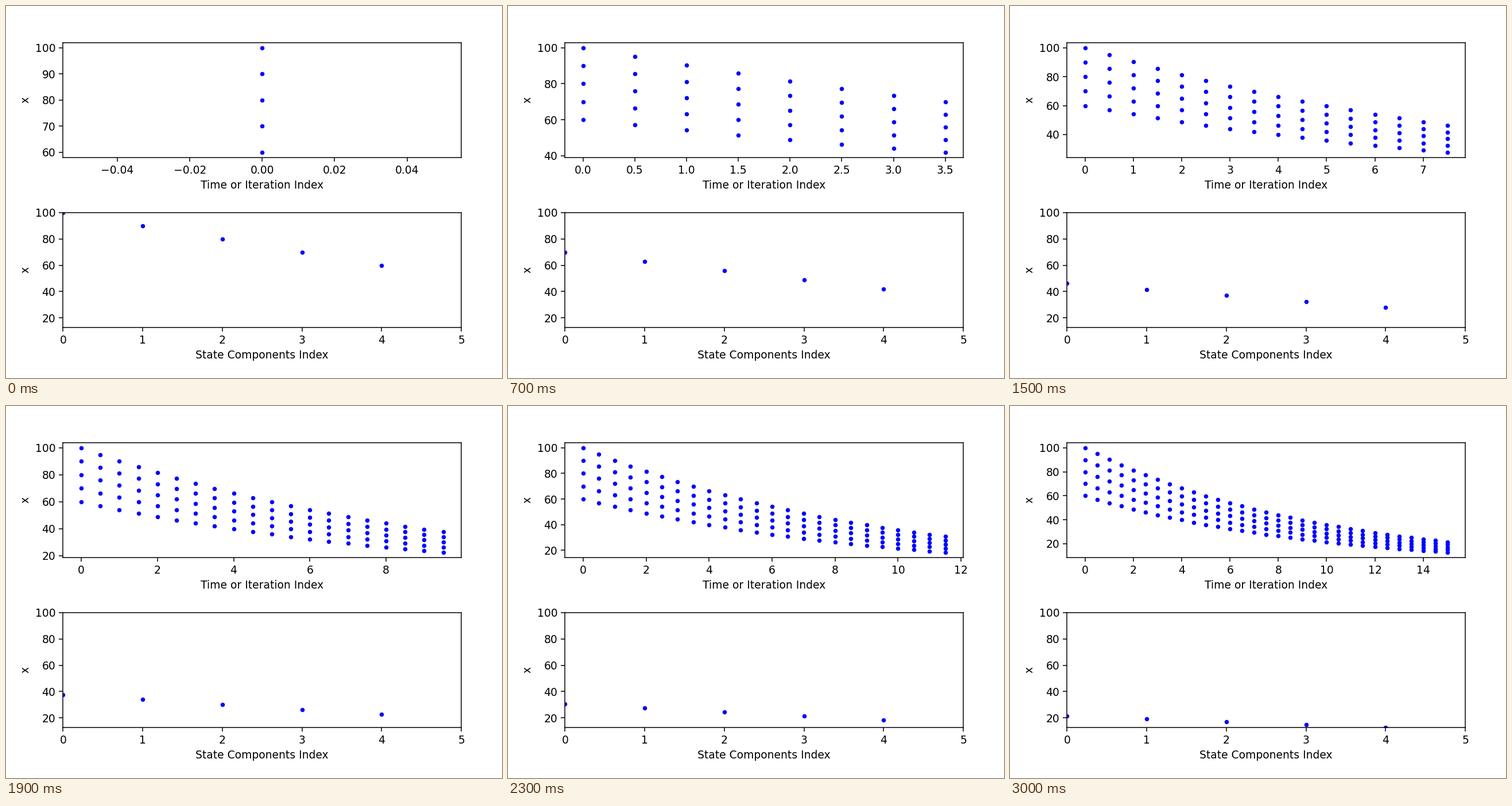
A matplotlib script for the animation above (3100 ms loop, 864 px wide and 648 px high).

```python
import numpy as np
import matplotlib.pyplot as plt
from matplotlib.animation import FuncAnimation

W, H, DPI = 864, 648, 135
STEPS, DT, DECAY = 31, 0.5, 0.95

plt.rcParams.update({"font.family": "DejaVu Sans", "font.size": 10})

start = np.arange(100, 59, -10)
times = np.arange(STEPS) * DT
states = start * DECAY ** np.arange(STEPS)[:, None]

fig = plt.figure(figsize=(W / DPI, H / DPI), dpi=DPI)


def panel(top, bottom, xlabel):
    """Add axes between two pixel rows measured from the top of the stage."""
    left, right = 99.4, 793.2
    ax = fig.add_axes([left / W, 1 - bottom / H,
                       (right - left) / W, (bottom - top) / H])
    ax.set_xlabel(xlabel)
    ax.set_ylabel("x")
    dots, = ax.plot([], [], "b.", markersize=6)
    return ax, dots


history_ax, history = panel(63.7, 263.8, "Time or Iteration Index")
state_ax, current = panel(359.7, 559.7, "State Components Index")
state_ax.set_xlim(0, len(start))
state_ax.set_ylim(states.min(), states.max())


def update(step):
    seen = step + 1
    history.set_data(np.repeat(times[:seen], len(start)), states[:seen].ravel())
    history_ax.relim()
    history_ax.autoscale_view()
    current.set_data(np.arange(len(start)), states[step])
    return history, current


anim = FuncAnimation(fig, update, frames=STEPS, interval=100,
                     repeat=True, repeat_delay=0, init_func=lambda: update(0))
plt.show()
```
